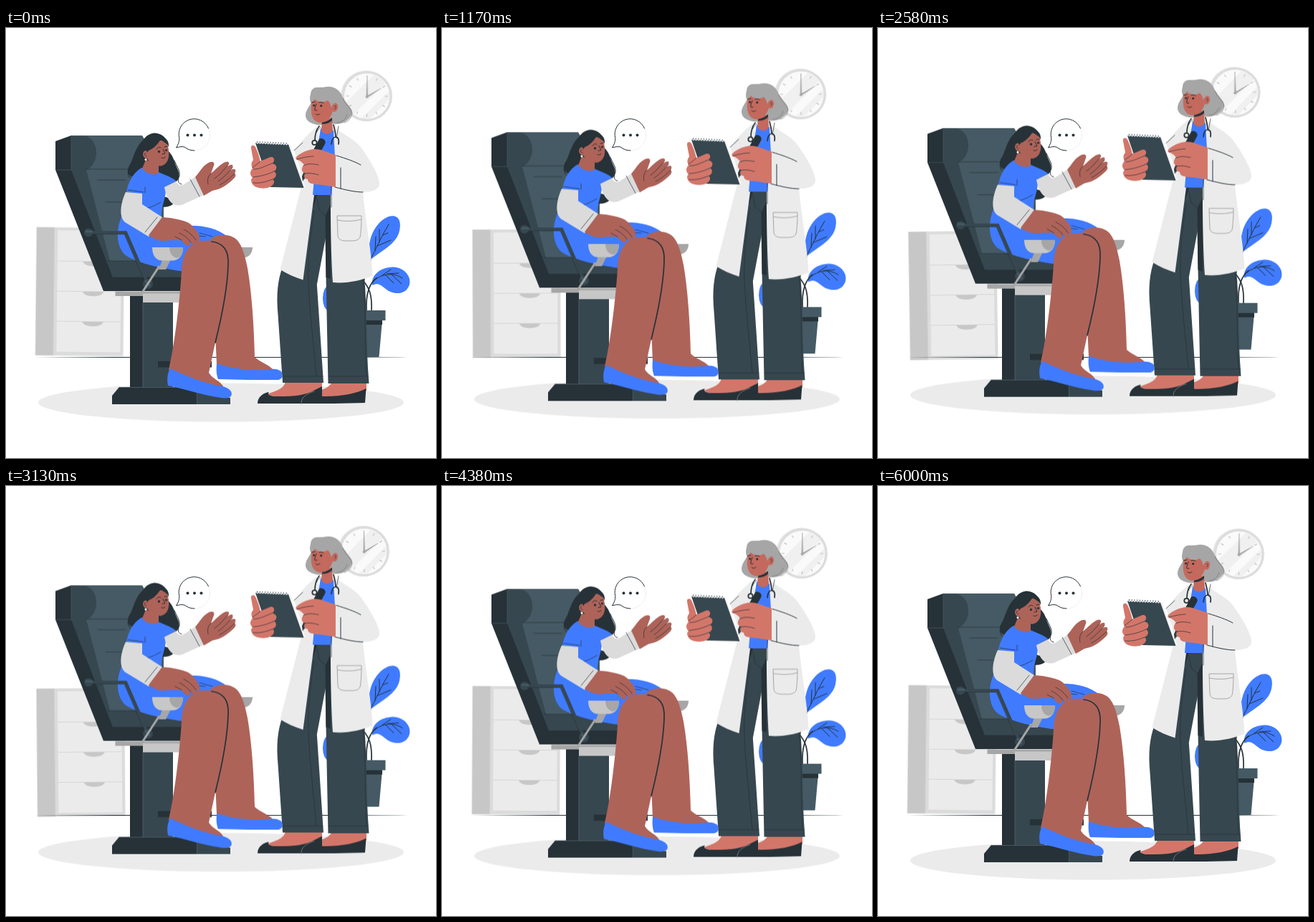
An HTML page for the animation above (6040 ms loop, 600 by 600 pixels).

```html
<!DOCTYPE html>
<html lang="en">
<head>
<meta charset="utf-8">
<title>Consultation</title>
<style>
  html, body { margin: 0; width: 100%; height: 100%; overflow: hidden; background: #fff; }
  svg { display: block; width: 100vw; height: 100vh; }

  /* palette */
  .blue { fill: #407bff; }
  .ink { fill: #263238; }
  .slate { fill: #37474f; }
  .steel { fill: #455a64; }
  .coat { fill: #ebebeb; }
  .sleeve { fill: #dbdbdb; }
  .grey { fill: #a6a6a6; }
  .silver { fill: #c7c7c7; }
  .tan { fill: #ae6359; }
  .rose { fill: #d3766a; }
  .face { fill: #c4695d; }
  .line { fill: none; stroke: #263238; stroke-width: 1; stroke-linecap: round; stroke-linejoin: round; }
  .thin { stroke-width: .7; }
  .bold { stroke-width: 1.7; }
  .soft { fill: none; stroke: #a6a6a6; stroke-width: 1; }

  /* one rise and fall, then a short rest before the loop */
  .float { animation: float 6040ms linear infinite; }
  .sway { animation: sway 6040ms linear infinite; transform-origin: 300px 300px; }
  @keyframes float {
    0%, 99.338%, 100% { transform: translateY(0); }
    49.669% { transform: translateY(-12px); }
  }
  @keyframes sway {
    0%, 99.338%, 100% { transform: rotate(.6deg); }
    39.735% { transform: rotate(-1deg); }
    89.404% { transform: rotate(1deg); }
  }
</style>
</head>
<body>
<svg viewBox="0 0 600 600">
  <defs>
    <clipPath id="glass"><circle cx="501.6" cy="93" r="31.5"/></clipPath>
    <path id="tick" d="M501.6 64v4"/>
    <path id="handle" d="M107.5 0h29.5c-2 4.200-7 6.200-14.700 6.200s-12.800-2-14.800-6.200z"/>
  </defs>

  <g class="float"><ellipse class="coat" cx="300" cy="522.5" rx="255" ry="27"/></g>

  <!-- wall clock and cabinet -->
  <g class="sway">
    <circle cx="500.6" cy="92.7" r="35.5" fill="#e0e0e0"/>
    <circle cx="502.3" cy="93" r="34.5" fill="#dbdbdb"/>
    <circle cx="501.6" cy="93" r="31.800" fill="#fafafa"/>
    <g clip-path="url(#glass)" fill="#f0f0f0">
      <path d="M466 108L516 58l14 14-50 50z"/>
      <path d="M490 128l45-45 5 7-42 42z"/>
    </g>
    <g stroke="#b4b4b4" stroke-width=".9">
      <use href="#tick"/>
      <use href="#tick" transform="rotate(30 501.6 93)"/>
      <use href="#tick" transform="rotate(60 501.6 93)"/>
      <use href="#tick" transform="rotate(90 501.6 93)"/>
      <use href="#tick" transform="rotate(120 501.6 93)"/>
      <use href="#tick" transform="rotate(150 501.6 93)"/>
      <use href="#tick" transform="rotate(180 501.6 93)"/>
      <use href="#tick" transform="rotate(210 501.6 93)"/>
      <use href="#tick" transform="rotate(240 501.6 93)"/>
      <use href="#tick" transform="rotate(270 501.6 93)"/>
      <use href="#tick" transform="rotate(300 501.6 93)"/>
      <use href="#tick" transform="rotate(330 501.6 93)"/>
    </g>
    <path class="grey" d="M500.400 94l.8-29.500h.7l1 29.500zM501 92.800l20.200-11.400.4.700-19.400 12.800z"/>
    <circle class="grey" cx="501.500" cy="93.800" r="2"/>

    <path class="silver" d="M42.500 280.500H68V459.500H42.500z"/>
    <path class="sleeve" d="M67.500 280.500H165.200V459.500H67.500z"/>
    <path class="coat" d="M72 284.500H161V454H72z"/>
    <path d="M72 327.500H161M72 369.500H161M72 411.500H161" fill="none" stroke="#d6d6d6"/>
    <g class="silver">
      <use href="#handle" y="328"/>
      <use href="#handle" y="370"/>
      <use href="#handle" y="412"/>
    </g>
  </g>

  <path class="ink" d="M40 459.400L150 459H450L561 459.400 450 460H150z"/>

  <g class="float">
    <!-- plant -->
    <path class="blue" d="M508 324C502 298 514 271 534 263C548 259 552 270 549 283C545 302 523 311 508 324zM511 359C509 345 522 334 540 333.500C556 334 566 347 563 358C559 371 546 372 536 368C526 363 522 353 511 359z"/>
    <ellipse class="blue" cx="450" cy="377" rx="8" ry="17"/>
    <path class="line bold" d="M501 394C495 368 499 340 509 323M510 394C511 370 506 362 498 352M503 394C502 372 506 357 517 349"/>
    <path class="line" d="M508 324C517 307 524 290 534 274M515 311L516 291M521 299L521 281M526 289L533 286M518 304L537 296M512 353C526 342 541 341 553 349M525 345L537 337M532 343L548 342M529 344L541 356M538 344L552 357"/>
    <path class="steel" d="M498 408H525L520.500 459H499z"/>
    <path class="ink" d="M498 407H525V414H498z"/>
    <path class="steel" d="M490 394H529.500V408H490z"/>

    <!-- chair -->
    <path class="ink" d="M173 372H191V502H173z"/>
    <path class="slate" d="M191 376H233V502H191z"/>
    <path class="ink" d="M212 465H287V473.500H212z"/>
    <path class="ink" d="M158 501H267V525H148V513z"/>
    <path class="slate" d="M267 507L313 516V525H267z"/>
    <path d="M158 501.500H267M191 383V502M266.500 507V525" fill="none" stroke="#61717a" stroke-width=".6"/>
    <path class="steel" d="M91 150H190L220 200V330H140L105 198H91z"/>
    <path class="ink" d="M69 158L91 150V198H69z"/>
    <path class="slate" d="M91 150H110C131 156 131 190 112 198H91z"/>
    <path class="ink" d="M69 198H92L150 340L252 347V367H136z"/>
    <path class="slate" d="M91 198H112L145 325H252V348H149z"/>
    <path class="line thin" d="M112 197H182M128 212H167M139 243H165M142 325H200M149 348H246"/>
    <path d="M69 198H91V151H190" fill="none" stroke="#4f6068" stroke-width=".6"/>
    <path class="grey" d="M152.500 367.500H243V374H152.500z"/>
    <path class="silver" d="M191 370.500H248V383H191z"/>
    <path class="grey" d="M295 306H344C344 315 338 321 328 321H295z"/>

    <!-- doctor: feet and trousers -->
    <path class="rose" d="M390 492H441V504C426 519 382 518 364 511C378 506 389 503 390 492zM455 492H503V506C482 518 442 518 427 510C440 504 453 503 455 492z"/>
    <path class="ink" d="M351 524C351 514 360 509 367 508C363 512 370 514 381 514C402 514 417 513 431 505L441 500V519L416 524z"/>
    <path class="ink" d="M413 524C411 515 421 511 429 508C425 513 435 514 447 514C468 514 489 510 502.500 503L501 523C475 524 440 524 413 524z"/>
    <path class="line thin" d="M412 525C411 515 420 510 430 507" style="stroke:#8b9498"/>
    <path class="slate" d="M427 232H456L446 293L433.800 358L443 495H386L379.500 400C377 372 379 352 386 333L414 345z"/>
    <path class="slate" d="M440 232H456L500 348C504 390 502 440 506.500 496H449.500L447 370L445.500 293z"/>
    <path class="ink" d="M445.500 262L446.500 348L453 350V246zM427 233H434L430 246L426 254z"/>
    <path class="line thin" d="M434 238L437 254L445 261M430 255C423 300 421 330 422 357C424 400 429 440 433 486M386 486H442M450 486H505M498 350C503 390 500 440 503 486"/>

    <!-- doctor: coat and shirt -->
    <path class="coat" d="M433 138C420 149 410 160 402 171L411 198L412 222L382.500 337C392 343 403 348 414.500 351.500L430 233L444 170z"/>
    <path class="coat" d="M455 137C470 147 486 156 494 165C508 184 521 206 521 217C521 226 510 229 498 229C502 270 511 320 511.500 346C496 352 475 357 456 355C453 310 452 235 454 175z"/>
    <path class="blue" d="M439 140L457 143L459 180L454 233H428L432 186z"/>
    <path class="line thin" d="M402 171L414 160M454 214V250"/>
    <path class="soft" d="M462 262H496C496 276 495 286 494.500 290C493 297 486 297 480 297C470 297 464 297 463 290zM462 268C474 270 485 270 496 267"/>
    <path class="line" d="M461 178C474 182 486 186 495 191M467 195V224M459 222C474 226 487 229 498 229"/>

    <!-- doctor: head -->
    <path class="grey" d="M426 98C422 85 432 80 440 84C452 78 466 84 470 97C476 107 484 113 483 119C478 133 462 136 455 133C436 139 417 133 418 121C419 111 428 107 426 98z"/>
    <path class="line thin" d="M470 98C474 108 482 112 483 119C482 126 477 131 472 132M462 132C469 132 474 127 476 121" style="stroke:#777"/>
    <path class="face" d="M441 126H455L456 143C452 150 443 149 440 143z"/>
    <path class="ink" d="M441 131C447 131 452 128 455 125V129C451 133 446 134 441 134z"/>
    <path class="face" d="M427 98C436 96 445 98 454 101L456 108C458 102 464 105 463 111C462 117 458 118 456 116C453 127 446 133 437 132C427 130 425 119 426 109z"/>
    <path class="grey" d="M425 104C421 89 432 81 444 83C456 84 466 94 466 105L457 104L454 111C453 107 452 104 449 101C442 105 434 103 431 99C430 101 428 103 425 104z"/>
    <circle class="ink" cx="429.700" cy="108" r="1.500"/>
    <circle class="ink" cx="439.700" cy="108.500" r="1.600"/>
    <path class="line" d="M426.500 104L431 103M437 104C440 103 442 104 443 105M433 106C432 110 430 113 431 115L434 115M432 120C434 122 436 121 438 120"/>
    <path class="line thin" d="M458 109C461 107 461 111 459 113"/>

    <!-- doctor: stethoscope -->
    <path class="line bold" d="M437 137C432 143 431 150 431 157M457 135C459 143 460 148 460 152M460 152C455 153 455 157 454 162M460 152C464 152 465 157 464 162"/>
    <circle cx="430.500" cy="160" r="3.200" fill="#ebebeb" stroke="#263238" stroke-width="1.800"/>
    <path class="line thin" d="M464 137L461 154M433 146C435 142 438 140 439 138"/>

    <!-- notepad, pen and hands -->
    <path d="M392 163L397 163L418 222H411z" fill="#f5f5f5"/>
    <path class="slate" d="M348 160.500L394 162.500L415.500 223L369 222z"/>
    <path d="M350 160L393 162" fill="none" stroke="#f5f5f5" stroke-width="3" stroke-dasharray="1.700 2"/>
    <path d="M350 159L393 161" fill="none" stroke="#455a64" stroke-width="2" stroke-dasharray="1 2.700"/>
    <path class="rose" d="M342 168C341 163 347 162 349 168C353 177 354 182 355 186L369 180C375 179 376 186 371 189C379 190 379 197 374 200C379 203 377 209 372 211C376 214 374 219 368 222C360 225 348 224 344 218C342 215 341 211 344 209C340 205 340 200 344 196C341 190 343 187 345 184z"/>
    <path class="line thin" d="M355 186C351 190 347 192 344 195M371 189C361 193 354 197 346 197M374 200C364 205 354 207 345 208M372 211C362 215 354 217 345 216"/>
    <path class="ink" d="M437 155C441 152 448 157 445 162L432 185L423 181zM421 188L426 192L414 214L413 207z"/>
    <path class="steel" d="M421 192L426 193L416 212L415 206z"/>
    <path class="rose" d="M405 180C411 174 422 169 431 169C440 169 449 174 460 177V222L441 219C427 218 421 217 421 211C416 211 415 206 418 203C412 202 411 195 416 191C413 187 409 184 406 184C404 183 404 181 405 180z"/>
    <path class="line thin" d="M406 183C414 181 421 179 429 179M415 192C423 188 430 190 436 191M417 203C425 202 430 203 436 205"/>

    <!-- patient: back hair, neck and dress -->
    <path class="ink" d="M193 155C179 166 178 184 171 194C167 204 174 210 184 207L202 203L238 214C246 206 239 197 236 189C233 178 228 172 222 168z"/>
    <path class="line" d="M174 190C169 199 168 208 177 212M235 185C238 193 243 198 242 206C239 213 240 217 245 218"/>
    <path class="ink" d="M217 234L236 240C235 247 227 250 218 250z"/>
    <path class="blue" d="M189 195C177 202 170 216 168 229L186 232L165 255C152 278 153 307 168 318C186 329 222 337 252 340L260 310L309 291C294 279 273 275 252 276L217 264C216 248 224 238 223 222L238 214C230 207 220 205 211 200z"/>
    <path class="tan" d="M195 184L213 190V202C208 207 195 203 190 196z"/>
    <path class="line thin" d="M170 226L192 229M194 222V230M198 251C206 249 210 246 216 243M270 286L288 291M268 290L278 291M222 222L237 214"/>

    <!-- armrest -->
    <path d="M115 285.500H167L198 357" fill="none" stroke="#37474f" stroke-width="4.500"/>
    <path d="M117 287.700H165L194 355" fill="none" stroke="#263238" stroke-width=".6"/>
    <circle class="slate" cx="115" cy="285.500" r="6"/>
    <circle class="slate" cx="198" cy="357" r="7"/>
    <path d="M112 284H120M195 353L200 359" fill="none" stroke="#455a64" stroke-width="3" stroke-linecap="round"/>

    <!-- patient: head -->
    <path class="tan" d="M195 171C189 171 190 183 197 182C201 190 211 194 218 192C227 189 229 178 226 165L220 153L201 155z"/>
    <path class="ink" d="M197 174C196 168 191 171 190 178C185 160 194 148 207 146.500C218 147 225 154 225 162C221 160 218 157 216 155C211 164 204 169 199 171z"/>
    <path class="ink" d="M213 157C219 156 224 160 227 166C228 157 222 151 213 151z"/>
    <circle class="ink" cx="213.500" cy="172.500" r="1.700"/>
    <circle class="ink" cx="223.500" cy="170.500" r="1.600"/>
    <path class="line" d="M210 169C212 166 214 166 216 167M221 166L225 165M219 169L222 175L218 176M217 181C219 182 221 182 222 180"/>
    <path class="line thin" d="M195 175C192 173 193 179 196 179"/>
    <circle cx="195" cy="183.500" r="1.500" fill="#fff"/>

    <!-- patient: legs and shoes -->
    <path class="tan" d="M286 294C294 288 308 287 317 292C328 297 333 315 337 335C343 370 346 415 347 459C354 466 366 469 373 477C350 487 311 485 294 470L292 425z"/>
    <path class="blue" d="M294 468C293 478 294 485 296 490C324 491 352 491 380 491C387 490 386 483 384 479C380 476 374 475 369 476C344 479 316 476 294 468z"/>
    <path class="tan" d="M245 340C245 320 253 300 272 297C296 294 310 304 311 322C312 350 303 399 292 439L283 481C288 490 300 492 304 502C282 513 239 497 227 477C235 443 242 386 245 340z"/>
    <path class="blue" d="M229 475C224 484 225 493 226 499C251 504 276 513 300 516C312 518 317 514 314 507C311 503 307 501 302 500C277 496 252 486 229 475z"/>
    <path class="line bold" d="M287 298C304 300 311 312 310 330C309 365 301 403 292 439"/>

    <!-- stirrup -->
    <path d="M214 332L190 369" fill="none" stroke="#a6a6a6" stroke-width="3"/>
    <path class="grey" d="M219 321H231L223 337H213z"/>
    <path class="silver" d="M204 306H247C247 318 241 324.500 232 324.500H218C209 324.500 204 317 204 306z"/>
    <path class="grey" d="M228 306H247C247 315 244 320 238 321C231 319 228 313 228 306z"/>

    <!-- patient: arms -->
    <path class="sleeve" d="M167 229L190 231V246L218 264L199 291L166 271C157 263 160 244 167 229z"/>
    <path class="sleeve" d="M221 222L237 214C239 218 243 221 247 219L264 208L278 232L245 247C231 250 224 238 221 222z"/>
    <path class="line thin" d="M194 285L211 264M257 211L270 235"/>
    <path class="tan" d="M199 289L218 264C234 265 247 268 255 272C265 279 272 290 270 297C269 299 266 298 265 295C267 302 264 305 260 301L257 297C259 305 253 306 249 301L244 296L229 296C216 299 207 295 199 289z"/>
    <path class="line thin" d="M248 281C256 285 261 290 265 296M242 286C250 290 254 294 258 299M236 291L245 296"/>
    <path class="tan" d="M264 208C271 200 274 193 281 189C287 185 292 187 290 192L286 203C293 197 299 190 306 187C311 185 313 189 309 193L307 195C314 189 318 190 316 195L312 199C320 194 322 198 319 203C321 204 321 207 318 210C308 220 299 225 288 227L276 234z"/>
    <path class="line thin" d="M286 203C281 207 281 213 282 218M309 192C303 199 297 206 291 210M316 195C309 203 302 210 296 214M319 203C311 211 304 216 298 219"/>
  </g>

  <!-- speech bubble -->
  <circle cx="263" cy="149.500" r="21.500" fill="#fff" stroke="#bbb" stroke-width=".6" stroke-dasharray="1 1.500"/>
  <path class="line" style="fill:#fff" d="M263 171C257 171 253 169 249 166C245 165 241 166 237.500 167C240 163 242 159 241.800 153.500A21.500 21.500 0 0 1 282.500 140"/>
  <g class="ink">
    <circle cx="253.500" cy="149.500" r="2"/>
    <circle cx="263" cy="149.500" r="2"/>
    <circle cx="272.500" cy="149.500" r="2"/>
  </g>
</svg>
</body>
</html>
```
